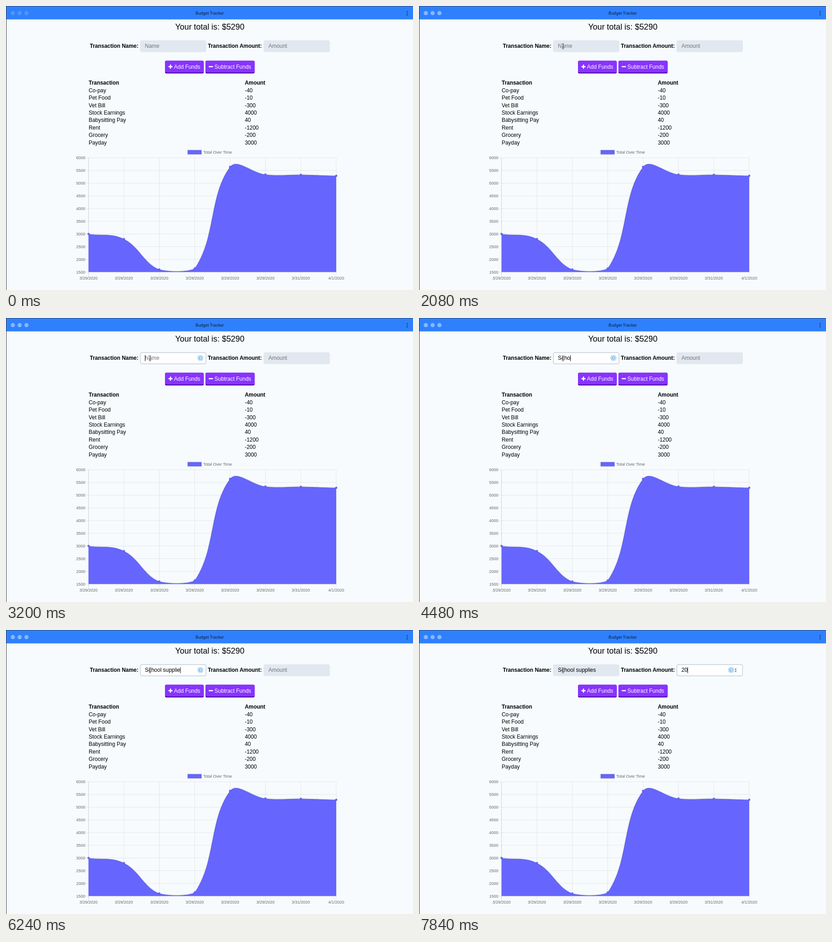
Recreate the animation shown at these times as an HTML page. Size 896x625 px, loop 8 s.

```html
<!DOCTYPE html>
<html lang="en">
<head>
<meta charset="utf-8">
<title>Budget Tracker</title>
<style>
html, body { margin: 0; width: 100%; height: 100%; overflow: hidden; background: #f7fbfe; }
svg { display: block; font: 11.95px "Liberation Sans", Arial, sans-serif; }
text { white-space: pre; }
.bold { font-weight: bold; }
.tick { font-size: 9px; fill: #666; }
.white { fill: #fff; }
</style>
</head>
<body>
<svg id="stage" width="896" height="625" viewBox="0 0 896 625"></svg>
<script>
const stage = document.getElementById("stage");

function add(tag, attrs = {}, parent = stage) {
  const el = document.createElementNS("http://www.w3.org/2000/svg", tag);
  for (const k in attrs) el.setAttribute(k, attrs[k]);
  parent.append(el);
  return el;
}
function label(x, y, str, attrs = {}, parent = stage) {
  const el = add("text", { x, y, ...attrs }, parent);
  el.textContent = str;
  return el;
}
const rect = (x, y, width, height, fill, more = {}, parent = stage) =>
  add("rect", { x, y, width, height, fill, ...more }, parent);
const circle = (cx, cy, r, fill, more = {}, parent = stage) =>
  add("circle", { cx, cy, r, fill, ...more }, parent);
const path = (d, more = {}, parent = stage) => add("path", { d, fill: "none", ...more }, parent);
const show = (el, on) => el.setAttribute("opacity", +on);

// Window
rect(0, 0, 896, 625, "#f7fbfe");
rect(0, 0, 896, 29.5, "#2f80fd");
rect(0, 0, 896, 1, "#26466f");
rect(0, 0, 1, 625, "#2c3440");
const lights = [15, 30, 45].map(x => circle(x, 15.7, 4.6, "#4f95fe"));
label(448.5, 19, "Budget Tracker",
  { "text-anchor": "middle", style: "font:9.3px Roboto,sans-serif", fill: "#0c2038" });
[12.2, 16, 19.8].forEach(y => circle(883, y, 1.1, "#14294a"));

// Form
label(448.7, 52.3, "Your total is: $5290", { "text-anchor": "middle", "font-size": 17.9 });
label(184.6, 92, "Transaction Name:", { class: "bold" });
label(444.3, 92, "Transaction Amount:", { class: "bold" });

function clock(x) {
  const g = add("g", { transform: `translate(${x} 88.2)` });
  circle(0, 0, 6.6, "#a3cff2", {}, g);
  circle(0, 0, 4.8, "#8fc3ee", { stroke: "#fff", "stroke-width": 1 }, g);
  path("M0-3V.4L2.4 1.8", { stroke: "#fff", "stroke-width": 1.2 }, g);
  return g;
}
function field(x, hint, iconX) {
  const box = rect(x, 75.5, 146, 26, "#e2e8f0", { rx: 4 });
  const rim = rect(x + .7, 76.2, 144.6, 24.6, "#fff", { rx: 3.6, stroke: "#bfc9d5", "stroke-width": 1.3 });
  const text = label(x + 10.8, 92, hint);
  return { x: x + 10.8, hint, box, rim, text, icon: clock(iconX), caret: rect(0, 82, 1, 13, "#000") };
}
const nameField = field(295, "Name", 428);
const amountField = field(567, "Amount", 687);

const spinner = add("g");
rect(693.3, 82.7, 7.4, 11.6, "#fff", { rx: 3, stroke: "#ddd", "stroke-width": .8 }, spinner);
path("M695 87.3L697 84.6L699 87.3ZM695 89.7L697 92.4L699 89.7Z", { fill: "#555" }, spinner);

function button(x, w, textX, str, icon) {
  rect(x, 120.5, w, 28, "#4c0aa5", { rx: 3 });
  rect(x, 120.5, w, 25.8, "#8833ff", { rx: 3 });
  path(icon, { stroke: "#fff", "stroke-width": 2.5, "stroke-linecap": "round" });
  label(textX, 138, str, { class: "white" });
}
button(350, 85.3, 369.8, "Add Funds", "M358.6 133.5H365.7M362.1 129.9V137.1");
button(439, 108.3, 458.8, "Subtract Funds", "M447.4 133.5H454.6");

// Table
const entries = [["Payday", 3000], ["Grocery", -200], ["Rent", -1200], ["Babysitting Pay", 40],
  ["Stock Earnings", 4000], ["Vet Bill", -300], ["Pet Food", -10], ["Co-pay", -40]];
[["Transaction", "Amount"], ...[...entries].reverse()].forEach(([name, sum], i) => {
  const y = 173.3 + i * 16.42, look = i ? {} : { class: "bold" };
  label(182, y, name, look);
  label(525.7, y, sum, look);
});

// Chart
const left = 181.7, right = 727, top_ = 334, bottom = 585.6, gap = (right - left) / 7;
const faint = "rgba(0,0,0,.1)";
rect(400, 317.2, 30.4, 9.2, "#6666ff", { stroke: faint, "stroke-width": 2 });
label(434.3, 325, "Total Over Time", { class: "tick" });
for (let i = 0; i < 10; i++) {
  const y = top_ + i * (bottom - top_) / 9;
  path(`M${left - 7.5} ${y}H${right}`, { stroke: faint, "stroke-width": .8 });
  label(174.5, y + 3, 6000 - 500 * i, { class: "tick", "text-anchor": "end" });
}
const days = [..."333333"].map(() => "3/29/2020").concat("3/31/2020", "4/1/2020");
days.forEach((day, i) => {
  const x = left + i * gap;
  path(`M${x} ${top_}V${bottom + 7.5}`, { stroke: i ? faint : "rgba(0,0,0,.22)", "stroke-width": .8 });
  label(x, 601.6, day, { class: "tick", "text-anchor": "middle" });
});

let total = 0;
const pts = entries.map(([, sum], i) => {
  total += sum;
  return [left + i * gap, bottom - (total - 1500) / 4500 * (bottom - top_)];
});
// Smoothed line: handles follow the neighbours' direction, kept inside the plot
function handle(i, side) {
  const p = pts[i], a = pts[i - 1] || p, b = pts[i + 1] || p;
  const da = Math.hypot(p[0] - a[0], p[1] - a[1]), db = Math.hypot(b[0] - p[0], b[1] - p[1]);
  const k = .4 * side * (side > 0 ? db : da) / (da + db);
  const y = p[1] + k * (b[1] - a[1]);
  return [p[0] + k * (b[0] - a[0]), Math.min(bottom, Math.max(top_, y))];
}
let curve = "M" + pts[0];
for (let i = 1; i < pts.length; i++) curve += `C${handle(i - 1, 1)} ${handle(i, -1)} ${pts[i]}`;
path(`${curve}V${bottom}H${left}Z`, { fill: "#6666ff" });
path(curve, { stroke: faint, "stroke-width": 2.2 });
pts.forEach(([x, y]) => circle(x, y, 2.4, "#6666ff", { stroke: faint, "stroke-width": .8 }));

// Pointers
const arrow = path("M0 0V10.6L2.5 8.4L4.1 12.2L5.9 11.4L4.3 7.8H7.6Z",
  { fill: "#000", stroke: "#fff", "stroke-width": .8 });
const beam = add("g");
const beamShape = "M-2.4-5.8Q0-5.8 0-4.4Q0-5.8 2.4-5.8M0-4.6V4.6M-2.4 5.8Q0 5.8 0 4.4Q0 5.8 2.4 5.8M-1.5 1.6H1.5";
path(beamShape, { stroke: "#fff", "stroke-width": 2, opacity: .6 }, beam);
path(beamShape, { stroke: "#333", "stroke-width": 1 }, beam);

// Typing: [time, number of letters]
const nameKeys = [[4160, 1], [4320, 3], [4480, 4], [4640, 5], [4800, 6], [4960, 8],
  [5440, 9], [5600, 10], [5760, 11], [5920, 12], [6080, 13], [6240, 14], [6400, 15]];
const amountKeys = [[7680, 1], [7840, 2]];

function drawField(f, t, start, end, value, keys) {
  const done = keys.filter(k => k[0] <= t);
  const [keyTime, count] = done.length ? done[done.length - 1] : [start, 0];
  const focus = t >= start && t < end;
  f.text.textContent = count ? value.slice(0, count) : f.hint;
  f.text.setAttribute("fill", count ? "#000" : "#757575");
  show(f.rim, focus);
  show(f.icon, focus ? Math.min(1, Math.max(0, (t - start) / 320)) : 0);
  show(f.caret, focus && (t - keyTime) % 960 < 480 || focus && count);
  f.caret.setAttribute("x", f.x + (count ? f.text.getComputedTextLength() : 0));
}

function drawPointer(t) {
  const k = Math.min(1, (t - 320) / 480);
  const x = t < 1120 ? 361 - 42.5 * k : 317, y = t < 1120 ? 67.5 + 41 * k : 88.7;
  const inField = y > 75 && y < 101;
  show(arrow, t >= 320 && !inField);
  show(beam, t >= 320 && inField);
  for (const el of [arrow, beam]) el.setAttribute("transform", `translate(${x} ${y})`);
}

function frame(now) {
  const t = Math.floor(now % 8000 / 160) * 160;
  lights.forEach(l => l.setAttribute("fill", t < 1440 ? "#4f95fe" : "#86b7ff"));
  drawField(nameField, t, 2240, 6720, "School supplies", nameKeys);
  drawField(amountField, t, 6720, 8000, "20", amountKeys);
  show(spinner, t >= 6720);
  drawPointer(t);
  requestAnimationFrame(frame);
}
frame(0);
</script>
</body>
</html>
```
